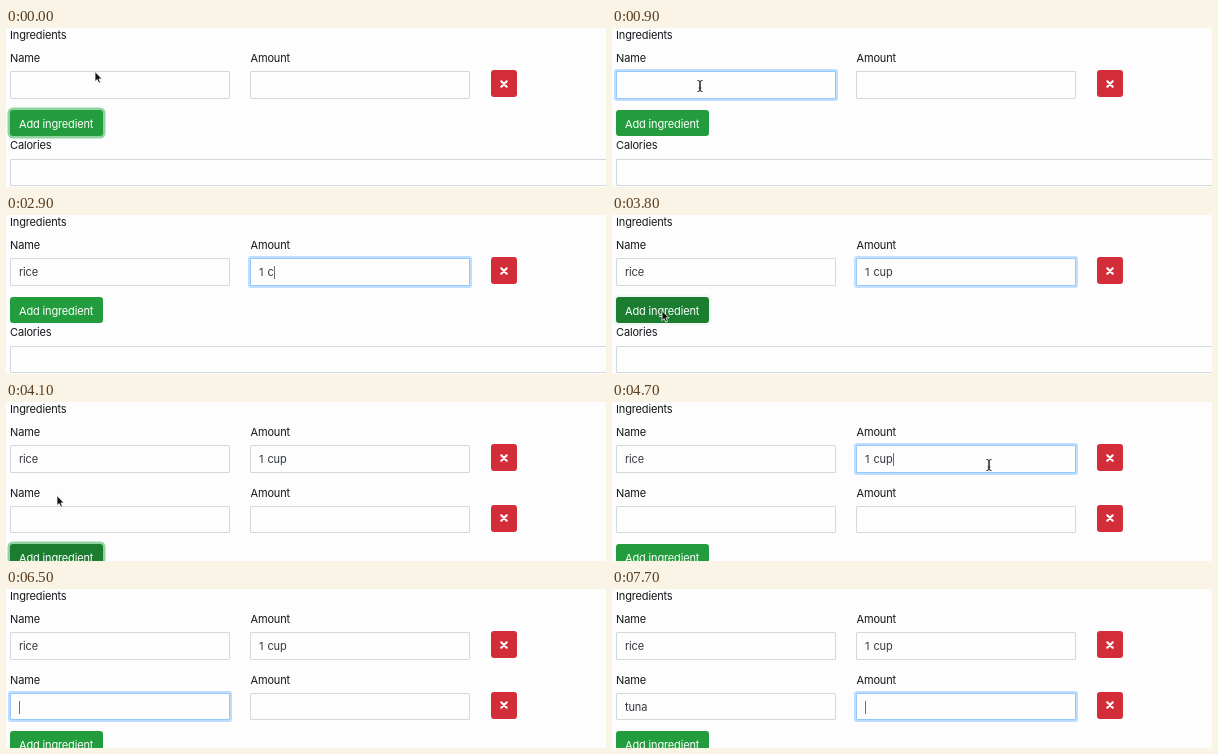
Animation of 600x159 px, one loop 8 s. Source, as an HTML page:

```html
<!DOCTYPE html>
<html lang="en">
<head>
<meta charset="utf-8">
<title>Ingredient form</title>
<style>
  html, body { margin: 0; width: 100%; height: 100%; overflow: hidden; background: #fdfdfe; }
  #stage { position: relative; width: 600px; height: 159px; overflow: hidden;
    font: 11px Inter, Roboto, sans-serif; letter-spacing: -.15px; color: #14171a; }
  #stage div, svg { position: absolute; box-sizing: border-box; white-space: pre; }
  .row, #foot { left: 0; width: 100%; height: 120px; }
  .label { line-height: 16px; left: 4px; }
  .input { --p: 0; width: 220px; height: 27.3px; padding-left: 8px; line-height: 26px;
    color: #33383d; word-spacing: 1.2px; background: #fdfdfe;
    border: 1px solid color-mix(in srgb, #93c6fd calc(var(--p) * 100%), #d3d8dc);
    border-radius: 1px; box-shadow: 0 0 0 2px rgb(0 123 255 / calc(var(--p) * .25)); }
  .input i { display: inline-block; width: 1px; height: 13px; margin-right: -1px;
    vertical-align: -3px; background: #707070; }
  .del { --p: 0; left: 484.5px; top: 42px; width: 26px; height: 27px; border-radius: 3px;
    background: color-mix(in srgb, #bd2130 calc(var(--p) * 100%), #d32d3a);
    box-shadow: 0 0 0 2.5px rgb(220 53 69 / calc(var(--p) * .5)); }
  .del svg { left: 9px; top: 9.5px; }
  #add { --p: 0; left: 4px; top: 81.5px; width: 93px; height: 26.5px; padding-left: 9px;
    line-height: 28px; border-radius: 3px; color: #fff;
    box-shadow: 0 0 0 2.5px rgb(40 167 69 / calc(var(--p) * .5)); }
</style>
</head>
<body>
<div id="stage"></div>
<script>
const stage = document.getElementById('stage');
const $ = id => document.getElementById(id);
const label = (text, x, y) => `<div class="label" style="left:${x}px;top:${y}px">${text}</div>`;
const input = (id, x, y, w = 220) =>
  `<div class="input" id="${id}" style="left:${x}px;top:${y}px;width:${w}px"></div>`;
const row = (n, y) => `<div class="row" id="row${n}" style="top:${y}px">
  ${label('Name', 4, 22)}${label('Amount', 244.5, 22)}${input('name' + n, 4, 43.3)}${input('amount' + n, 244, 43.3)}
  <div class="del" id="del${n}"><svg width="8" height="8"><path d="M1.3 1.3 6.7 6.7M6.7 1.3 1.3 6.7"
    stroke="#fff" stroke-width="2.1" stroke-linecap="round"/></svg></div></div>`;

const ROW = 60.5, LOOP = 8000;
stage.innerHTML = label('Ingredients', 4, -1) + row(1, 0) + row(2, ROW) +
  `<div id="foot"><div id="add">Add ingredient</div>${label('Calories', 4, 109)}${input('calories', 4, 131, 620)}</div>
  <svg id="pointer" width="20" height="24" viewBox="-8 -8 20 24" style="margin:-8px">
    <path id="arrow" d="M0 .6V10.6L2.2 8.6 3.8 12.1 5.5 11.4 4 7.9H7.1Z" fill="#111" stroke="#fff" stroke-width=".8"/>
    <path id="beam" d="M-2.5-5.5Q0-5.5 0-4V4Q0 5.5-2.5 5.5M2.5-5.5Q0-5.5 0-4V4Q0 5.5 2.5 5.5M-1.3 2H1.3"
      fill="none" stroke="#222"/></svg>`;

const focus = [[-1000, 'add'], [300, 'name1'], [1700, 'amount1'], [3800, 'add'],
  [4500, 'amount1'], [5000, 'del1'], [5400, 'name2'], [7500, 'amount2']];
const keys = [[400, 'name1', ''], [1000, 'name1', 'r'], [1100, 'name1', 'ri'], [1300, 'name1', 'ric'],
  [1400, 'name1', 'rice'], [2000, 'amount1', '1'], [2600, 'amount1', '1 '], [2900, 'amount1', '1 c'],
  [3000, 'amount1', '1 cu'], [3200, 'amount1', '1 cup'], [6200, 'name2', 'y'], [6500, 'name2', ''],
  [6600, 'name2', 't'], [6700, 'name2', 'tu'], [6800, 'name2', 'tun'], [6900, 'name2', 'tuna'],
  [7000, 'name2', 'tuna']];
const path = [[0, 89, 43], [300, 88, 58], [3500, 88, 58], [3800, 50, 95], [4100, 51, 93],
  [4200, 60, 92], [4500, 377, 63], [LOOP, 377, 63]];
const fields = ['name1', 'amount1', 'name2', 'amount2'];

function pointerAt(t) {
  const i = path.findIndex(p => p[0] > t);
  const [t0, x0, y0] = path[i - 1], [t1, x1, y1] = path[i];
  const k = (t - t0) / (t1 - t0);
  return [x0 + (x1 - x0) * k, y0 + (y1 - y0) * k];
}

function draw(t) {
  const added = t >= 4000;
  $('row2').style.display = added ? '' : 'none';
  $('foot').style.top = (added ? ROW : 0) + 'px';
  $('add').style.background = t >= 3700 && t < 4200 ? '#1b7d30' : '#229c3c';

  // Focus rings fade in and out over about 150 ms
  const done = focus.filter(f => f[0] <= t);
  const [since, active] = done.at(-1);
  const previous = done.at(-2)?.[1];
  const level = Math.min(1, .1 + (t - since) / 150);
  for (const id of [...fields, 'add', 'del1'])
    $(id).style.setProperty('--p', id === active ? level : id === previous ? 1 - level : 0);

  const typed = keys.filter(k => k[0] <= t);
  const last = Math.max(since, typed.at(-1)?.[0] ?? 0);
  const blink = (t - last) % 1000 < 500;
  for (const id of fields) {
    const text = typed.findLast(k => k[1] === id)?.[2] ?? '';
    $(id).innerHTML = text + (id === active && blink ? '<i></i>' : '');
  }

  const [x, y] = pointerAt(t);
  const overInput = y > 44 && y < 71 && (x > 4 && x < 224 || x > 244 && x < 464);
  const visible = t < 1000 || t >= 3500 && t < 5000;
  $('pointer').style.cssText += `;left:${x}px;top:${y}px;display:${visible ? 'block' : 'none'}`;
  $('arrow').style.display = overInput ? 'none' : '';
  $('beam').style.display = overInput ? '' : 'none';
}

const start = performance.now();
let shown = -1;
function tick() {
  const t = Math.floor((performance.now() - start) % LOOP / 100) * 100;
  if (t !== shown) draw(shown = t);
  requestAnimationFrame(tick);
}
tick();
</script>
</body>
</html>
```
